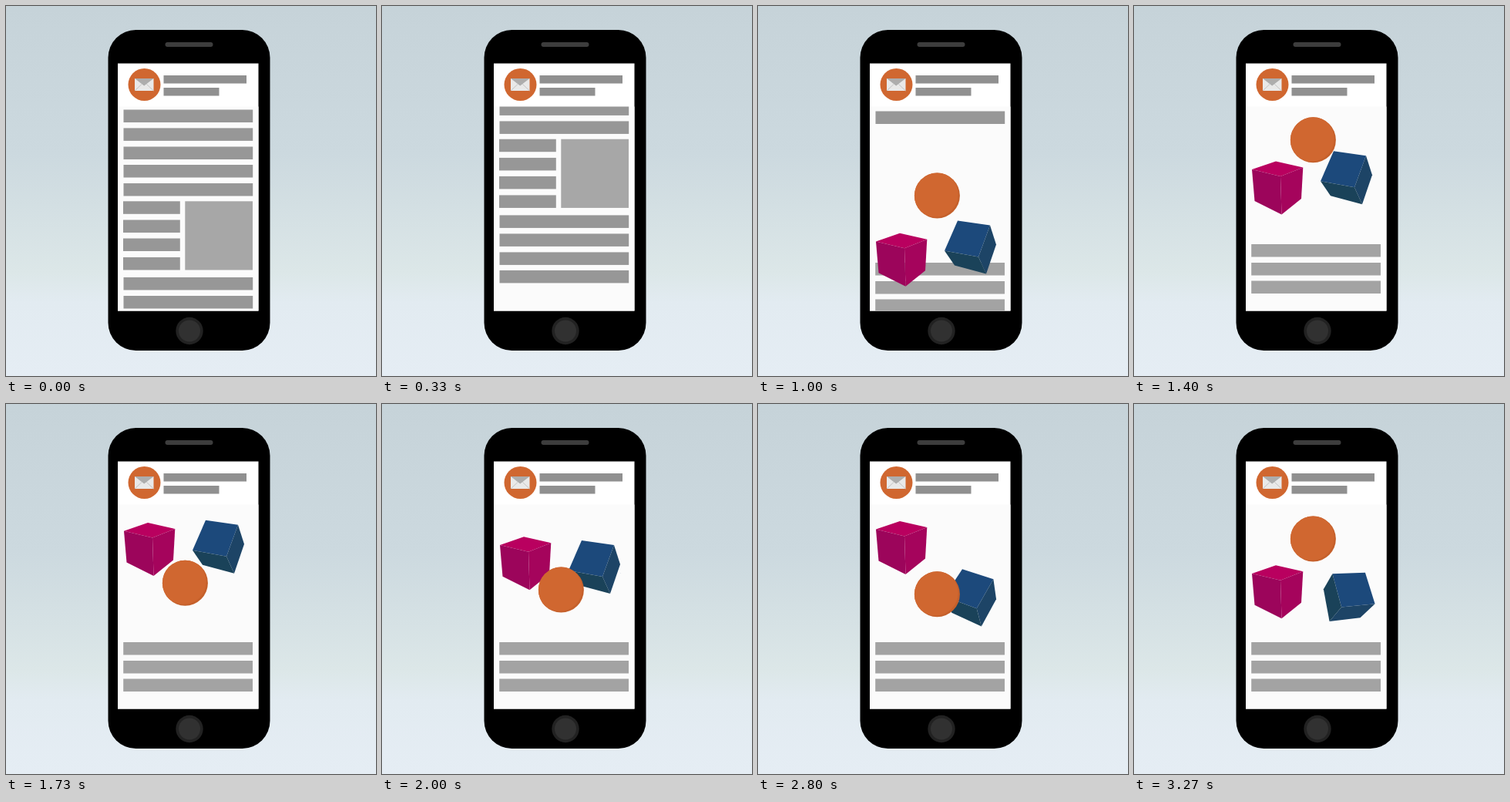
These frames come from a looping animation (480 px wide and 480 px high, 3.99 s). An HTML page:

```html
<!DOCTYPE html>
<html lang="en">
<head>
<meta charset="utf-8">
<title>Scrolling newsletter</title>
<style>
  html, body { margin: 0; width: 100%; height: 100%; overflow: hidden; }
  svg { display: block; width: 100%; height: 100%; }
</style>
</head>
<body>
<svg viewBox="0 0 480 480">
  <defs>
    <linearGradient id="sky" x1="0" y1="0" x2="0" y2="1">
      <stop offset="0" stop-color="#c6d3d9"/>
      <stop offset=".4" stop-color="#ccd9df"/>
      <stop offset=".72" stop-color="#dce7e8"/>
      <stop offset=".8" stop-color="#e2ebf1"/>
      <stop offset="1" stop-color="#e5edf4"/>
    </linearGradient>
    <clipPath id="view"><rect x="145" y="130.5" width="182.5" height="265"/></clipPath>
    <clipPath id="disc"><circle r="29.5"/></clipPath>
  </defs>

  <rect width="480" height="480" fill="url(#sky)"/>
  <rect x="132.5" y="31" width="210" height="416" rx="36"/>
  <rect x="206.5" y="47" width="62" height="6" rx="3" fill="#3d3d3d"/>
  <circle cx="238" cy="421.5" r="17.7" fill="#222"/>
  <circle cx="238" cy="421.5" r="14" fill="#313131"/>
  <rect x="145" y="74.5" width="182.5" height="321" fill="#fff"/>
  <rect x="145" y="130.5" width="182.5" height="265" fill="#fbfbfb"/>

  <circle cx="179.5" cy="102" r="21" fill="#d06730"/>
  <rect x="167" y="94" width="24.5" height="16" fill="#e9e9e9"/>
  <path d="M167 110L176 101.5M191.5 110L182.5 101.5" stroke="#c4c4c4" fill="none"/>
  <path d="M167 94H191.5L179.2 103.5Z" fill="#adadad"/>
  <path d="M204.5 90H312V100.5H204.5ZM204.5 106H276.5V116.5H204.5Z" fill="#909090"/>

  <g clip-path="url(#view)">
    <g id="page"></g>
    <g id="pink"></g>
    <g id="blue"></g>
    <g id="ball">
      <circle r="29.5" fill="#c5602b"/>
      <circle cx="-2" cy="-1.6" r="29.3" fill="#d06730" clip-path="url(#disc)"/>
    </g>
  </g>
</svg>
<script>
const LOOP = 3990, STEP = 200 / 3, LAST = 49;
const el = id => document.getElementById(id);

const bar = (x, y, w, h = 16.5, fill = '#979797') =>
  `<rect x="${x}" y="${y}" width="${w}" height="${h}" fill="${fill}"/>`;
const face = (fill, points) => `<polygon points="${points}" fill="${fill}"/>`;

el('page').innerHTML =
  [134.5, 158.4, 182.5, 206, 230, 352, 376, 400, 423.5].map(y => bar(152.5, y, 167.7)).join('') +
  [253.3, 277.5, 301.5, 326].map(y => bar(152, y, 73.8)).join('') +
  bar(232.3, 253.3, 87.7, 89.2, '#a7a7a7') +
  [620, 644, 667.5].map(y => bar(152.2, y, 167.8, 16.5, '#a3a3a3')).join('');

el('pink').innerHTML =
  face('#b9005f', '153,10.7 184,0 219.3,8 190,19.5') +
  face('#9c055b', '153,10.7 190,19.5 191.5,69 156.5,51.5') +
  face('#a5045c', '190,19.5 219.3,8 217,48.5 191.5,69');

el('blue').innerHTML =
  face('#1c497b', '-35,5 -18,-34 24,-28 9,13') +
  face('#1d4466', '24,-28 32,-3 19,35 9,13') +
  face('#1a4259', '9,13 19,35 -22,24 -35,5');

// Smooth monotone curve through [time, value] keys, flat at every extremum.
function curve(keys) {
  const rate = i => (keys[i + 1][1] - keys[i][1]) / (keys[i + 1][0] - keys[i][0]);
  const slopes = keys.map((k, i) => {
    if (i === 0 || i === keys.length - 1) return 0;
    const a = rate(i - 1), b = rate(i);
    return a * b > 0 ? 2 * a * b / (a + b) : 0;
  });
  return t => {
    if (t >= keys[keys.length - 1][0]) return keys[keys.length - 1][1];
    let i = 0;
    while (i < keys.length - 2 && t >= keys[i + 1][0]) i++;
    const [t0, y0] = keys[i], [t1, y1] = keys[i + 1];
    const d = t1 - t0, u = Math.max(0, (t - t0) / d), v = 1 - u;
    return y0 * v * v * (1 + 2 * u) + y1 * u * u * (1 + 2 * v) +
      d * u * v * (slopes[i] * v - slopes[i + 1] * u);
  };
}

const scroll = curve([[0, 0], [670, 210], [1000, 287], [1070, 299], [1230, 311]]);
const ballY = curve([[0, 553], [670, 343], [1000, 246], [1380, 173.5], [1887, 249.5],
  [2400, 182], [2850, 249], [3200, 182.5], [3270, 175]]);
const pinkY = curve([[0, 602], [670, 392], [1000, 294.7], [1400, 201.4], [1840, 149],
  [2217, 209], [2745, 149.5], [3200, 209.3]]);
const blueY = curve([[0, 620], [670, 410], [1000, 312.5], [1400, 222.2], [1690, 184],
  [2000, 211], [2400, 252], [3200, 249.7]]);
const blueTurn = curve([[2670, 0], [3200, 64.5]]);

// The motion advances fifteen times a second, on whole hundredths.
function stepped(t) {
  const start = n => Math.round(n * STEP / 10) * 10;
  let n = Math.floor((t + 4) / STEP);
  if (start(n) > t) n--;
  return start(Math.min(n, LAST));
}

function draw(now) {
  const t = stepped(now % LOOP);
  const move = (id, x, y, turn = 0) =>
    el(id).setAttribute('transform', `translate(${x} ${y.toFixed(2)}) rotate(${turn})`);
  move('page', 0, -scroll(t));
  move('pink', 0, pinkY(t));
  move('blue', 277, blueY(t), blueTurn(t));
  move('ball', 232.4, ballY(t));
}

const begin = performance.now();
function tick() {
  draw(performance.now() - begin);
  requestAnimationFrame(tick);
}
tick();
</script>
</body>
</html>
```
